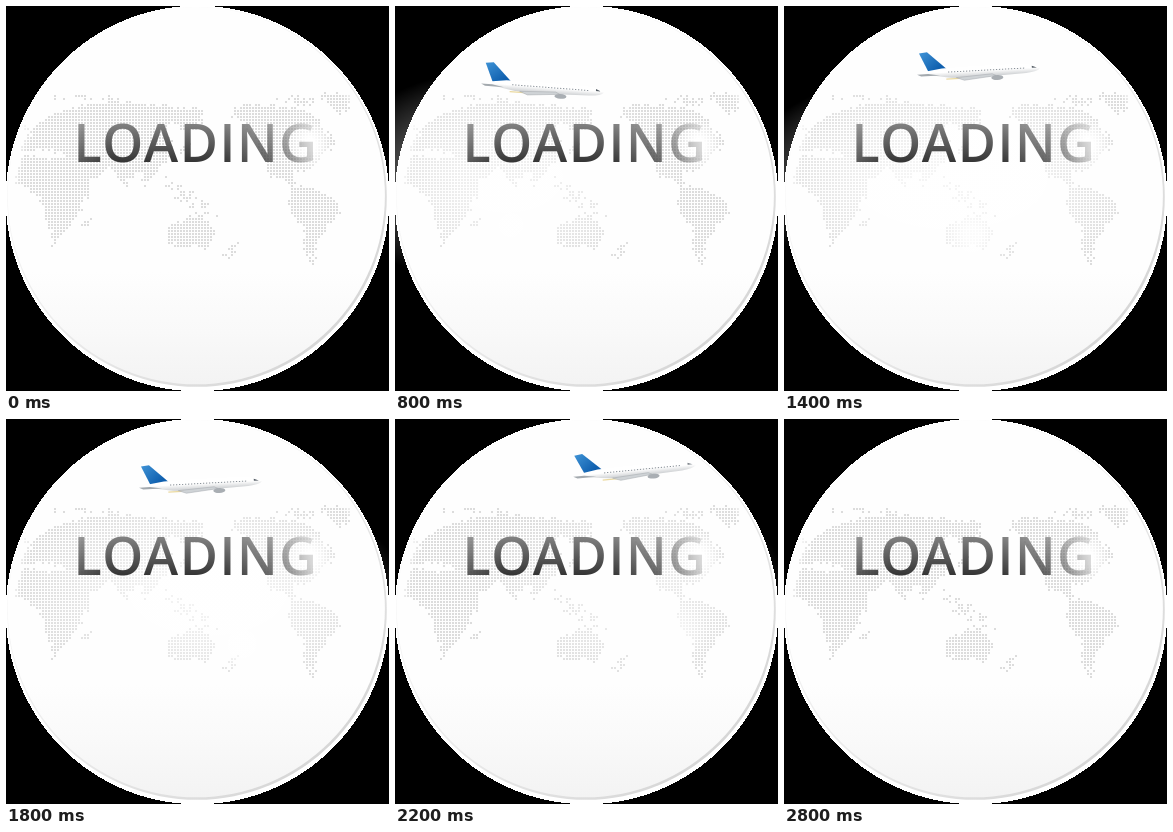
An HTML page for the animation above (3.8 s loop, 383x385 px).

```html
<!DOCTYPE html>
<html lang="en">
<head>
<meta charset="utf-8">
<title>Loading</title>
<style>
  html, body { margin: 0; width: 100%; height: 100%; overflow: hidden; background: #000; }
  svg { display: block; width: 383px; height: 385px; }
  text { font: 600 52px "Open Sans", "Noto Sans", sans-serif; letter-spacing: 1.6px; }
</style>
</head>
<body>
<svg viewBox="0 0 383 385">
  <defs>
    <linearGradient id="disc" x2="0" y2="1">
      <stop offset=".7" stop-color="#fefefe"/>
      <stop offset=".86" stop-color="#f9f9f9"/>
      <stop offset="1" stop-color="#f3f3f3"/>
    </linearGradient>
    <linearGradient id="rim" x2="1" y2="1">
      <stop offset=".1" stop-color="#fafafa"/>
      <stop offset=".5" stop-color="#ebebeb"/>
      <stop offset=".9" stop-color="#d4d4d4"/>
    </linearGradient>
    <linearGradient id="ink" x2="0" y2="1">
      <stop offset=".25" stop-color="#828282"/>
      <stop offset=".8" stop-color="#343434"/>
    </linearGradient>
    <linearGradient id="fade" gradientUnits="userSpaceOnUse" x1="72" x2="313">
      <stop offset="0" stop-color="#ccc"/>
      <stop offset=".14" stop-color="#fff"/>
      <stop offset=".6" stop-color="#fff"/>
      <stop offset=".8" stop-color="#bbb"/>
      <stop offset="1" stop-color="#222"/>
    </linearGradient>
    <radialGradient id="edge" gradientUnits="userSpaceOnUse" cx="191" cy="192" r="190">
      <stop offset=".93" stop-color="#fff"/>
      <stop offset="1" stop-color="#000"/>
    </radialGradient>
    <radialGradient id="cloud">
      <stop offset=".25" stop-color="#fff"/>
      <stop offset="1" stop-color="#fff" stop-opacity="0"/>
    </radialGradient>
    <linearGradient id="body" x2="0" y2="1">
      <stop offset=".4" stop-color="#fff"/>
      <stop offset="1" stop-color="#c4c7ca"/>
    </linearGradient>
    <linearGradient id="fin" x2="1" y2="1">
      <stop offset="0" stop-color="#3f93d6"/>
      <stop offset=".7" stop-color="#0f5fae"/>
    </linearGradient>
    <mask id="textMask" maskUnits="userSpaceOnUse" width="383" height="385">
      <rect width="383" height="385" fill="url(#fade)"/>
    </mask>
    <mask id="discMask" maskUnits="userSpaceOnUse" width="383" height="385">
      <rect width="383" height="385" fill="url(#edge)"/>
    </mask>
  </defs>

  <ellipse cx="191.5" cy="192.5" rx="191.8" ry="192.8" fill="#fff" shape-rendering="crispEdges"/>
  <circle cx="191" cy="191" r="189.8" fill="url(#rim)"/>
  <circle cx="190.3" cy="189.7" r="188.6" fill="url(#disc)"/>

  <g mask="url(#discMask)"><path id="map" fill="#dcdcdc"/></g>
  <ellipse id="veil" cy="172" ry="110" fill="url(#cloud)"/>
  <circle id="puff" r="30" fill="url(#cloud)"/>
  <ellipse cx="304" cy="139" rx="22" ry="26" fill="url(#cloud)"/>

  <g mask="url(#textMask)"><text x="67.6" y="155.5" fill="url(#ink)">LOADING</text></g>

  <g mask="url(#discMask)">
    <g id="plane">
      <path d="M-49-1-58-21-50-22-30-3-42 1Z" fill="url(#fin)"/>
      <path d="M-57-2-36-5Q10-6 46-5 58-4 62 0 60 3 48 4L-8 6Q-40 5-57-2Z" fill="url(#body)"/>
      <path d="M-50 0-61 0-57 2-38 2Z" fill="#a3a9ae"/>
      <path d="M-30-1H48" stroke="#8b9299" stroke-dasharray="1.3 1.7"/>
      <path d="M54-3 59-1H54Z" fill="#555d65"/>
      <path d="M-32 6H-14" stroke="#ead9a0" stroke-width="1.3"/>
      <path d="M-22 5 14 3 18 5-14 8Z" fill="#cfd3d6" stroke="#a5aaae" stroke-width=".5"/>
      <ellipse cx="19" cy="7" rx="6" ry="2.4" fill="#a9aeb3"/>
    </g>
  </g>
</svg>
<script>
const $ = id => document.getElementById(id);
const set = (id, attrs) => { for (const k in attrs) $(id).setAttribute(k, attrs[k]); };

let seed = 7;
const random = () => (seed = seed * 16807 % 2147483647) / 2147483647;
const jitter = size => (random() - .5) * 2 * size;

// Coarse continents on a dot grid, with a jittered test point for ragged coasts.
const land = new Path2D(
  'M12 148 21 130 38 112 60 104 104 94 201 104 186 127 162 117 166 150 147 168 141 182 133 165 118 180 106 162 78 178 62 150 40 142Z' +
  'M18 150 63 152 86 180 70 212 48 239 33 190 8 176Z' +
  'M161 222 192 207 211 227 203 242 164 239Z' +
  'M222 104 252 97 305 106 330 136 302 164 284 164 292 184 262 168 250 130Z' +
  'M284 180 312 182 336 203 310 240 308 263 298 240 298 222 281 198Z' +
  'M313 88 352 88 334 112Z');
const PITCH = 3;
const dots = new Set();
const dot = (x, y) => dots.add(`M${x} ${y}h2v2h-2z`);

function continents() {
  const ctx = document.createElement('canvas').getContext('2d');
  for (let y = 86; y < 268; y += PITCH)
    for (let x = 6; x < 358; x += PITCH)
      if (ctx.isPointInPath(land, x + 1 + jitter(2.5), y + 1 + jitter(2.5))) dot(x, y);
}

// Small islands strewn along a line.
function isles(count, spread, x0, y0, x1, y1) {
  for (let i = 0; i < count; i++) {
    const k = random();
    const x = x0 + (x1 - x0) * k + jitter(spread), y = y0 + (y1 - y0) * k + jitter(spread);
    dot(Math.round(x / PITCH) * PITCH, Math.round(y / PITCH) * PITCH - 1);
  }
}

continents();
isles(42, 8, 158, 178, 205, 203);
isles(12, 3, 212, 255, 232, 238);
isles(16, 3, 45, 91, 110, 92);
isles(24, 4, 270, 92, 310, 97);
isles(12, 2, 172, 152, 182, 136);
isles(10, 2, 78, 222, 83, 210);
isles(12, 3, 16, 116, 22, 130);
set('map', { d: [...dots].join('') });

const STEP = 200, LOOP = 3800, LAST = 14;

// Swoop in from the left, hover, then climb out to the right.
function flight(step) {
  if (step <= 5) {
    const u = 5 - step;
    return [195 - 48 * u, 70 + 6 * u * (3 - u), 5.3 * u - 1];
  }
  if (step < 10) return [194, 65.5, -3];
  const v = step - 10;
  return [200 + 39 * v, 62 - 10 * v, 2.5 * v - 8];
}

function draw(step) {
  const [x, y, turn] = flight(step);
  set('plane', {
    transform: `translate(${x} ${y}) rotate(${turn})`,
    display: step >= 1 && step <= 12 ? 'inline' : 'none'
  });
  const swell = Math.sin(Math.PI * step / LAST);
  set('veil', { cx: 40 + 18 * step, rx: 60 + 150 * swell, opacity: .7 * swell });
  set('puff', { cx: 20 + 24 * step, cy: 180 + 50 * swell, opacity: .8 * swell });
}

function tick() {
  draw(Math.min(LAST, Math.floor(performance.now() % LOOP / STEP)));
  requestAnimationFrame(tick);
}
tick();
</script>
</body>
</html>
```
